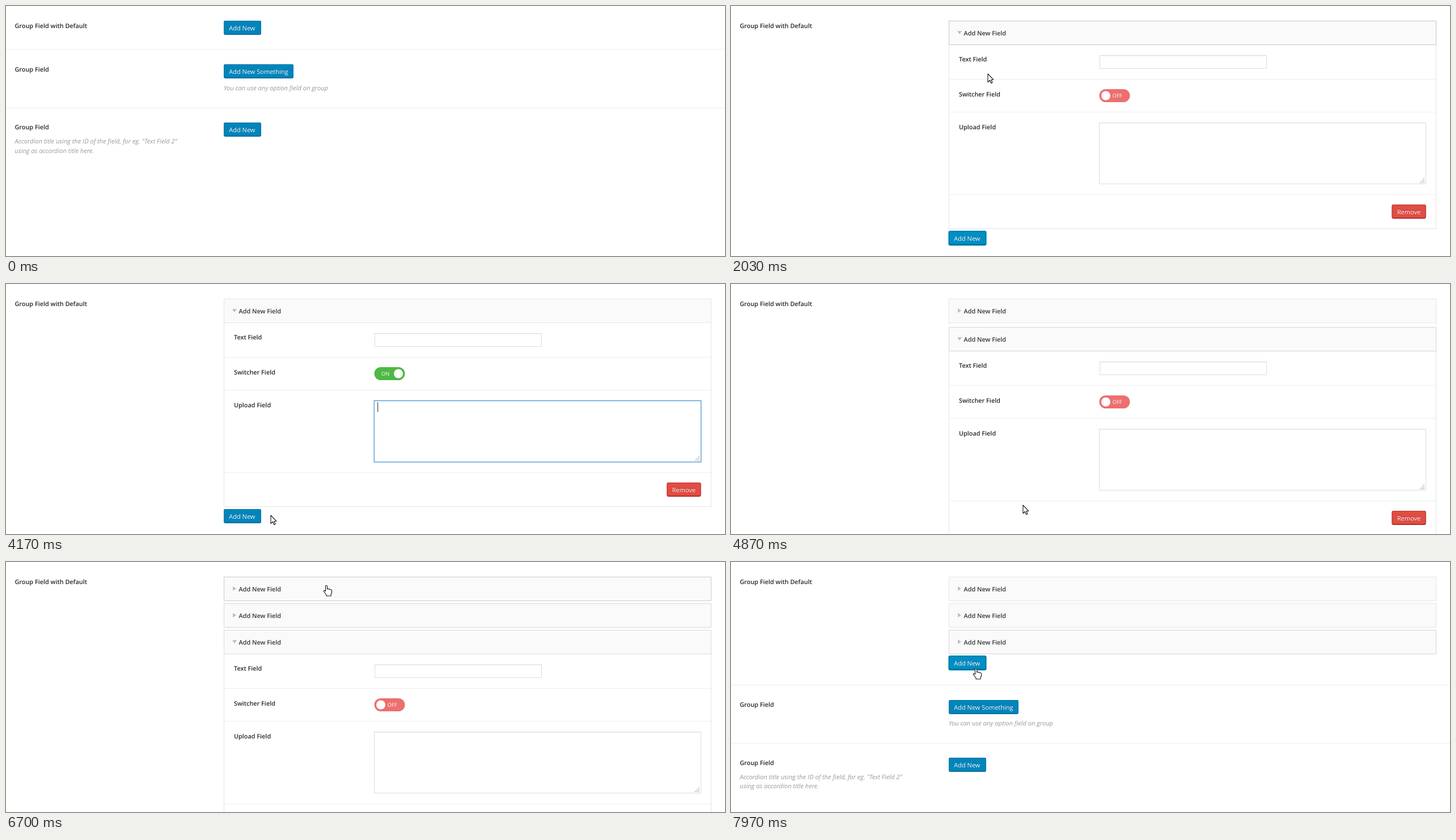
These frames come from a looping animation (1268x442 px, 8000 ms). An HTML page with a canvas:

```html
<!DOCTYPE html>
<html lang="en">
<head>
<meta charset="utf-8">
<title>Group field accordion</title>
<style>
html, body { margin: 0; width: 100%; height: 100%; overflow: hidden; background: #fff; }
canvas { display: block; }
</style>
</head>
<body>
<canvas id="stage" width="1268" height="442"></canvas>
<script>
const ctx = document.getElementById('stage').getContext('2d');
ctx.textRendering = 'geometricPrecision';
const LOOP = 8000, SLIDE = 200, FADE = 200, PACE = 2.35;
const TOP = 26, HEAD = 43, BODY = 325, PITCH = 46.8;
const LEFT = 384, WIDE = 860;
const FAMILY = '"Open Sans", "Noto Sans", sans-serif';
const BOLD = `600 10.85px ${FAMILY}`, PLAIN = `11px ${FAMILY}`;
const SMALL = `9.3px ${FAMILY}`, HINT = `italic 11.1px ${FAMILY}`;
const DARK = '#23282d', GREY = '#999', LINE = '#eee';
const BLUE = ['#0085ba', '#0073aa', '#006799'], LIT = ['#008ec2', '#006799', '#006799'];
const RED = ['#e14d43', '#c0342a', '#a02222'];

// Controls of an open panel, placed as in the topmost item.
const field = [650, 87, 295, 24], knob = [649.5, 147, 54, 23], area = [649, 206, 577, 109];

// Item i opens at clicks[i] and closes at clicks[i + 1].
const clicks = [1278, 4683, 6330, 7300];
const typeAt = 3120, switchAt = 3640, writeAt = 4000;

// Pointer stops: arrival time, x, y.
const stops = [
  [500, 500, 416], [1130, 424, 40], [2030, 453, 120], [2500, 560, 346], [3060, 720, 98],
  [3640, 690, 158], [3770, 700, 248], [4000, 700, 248], [4170, 467, 409], [4330, 396, 420],
  [4870, 515, 391], [5330, 519, 145], [5620, 363, 300], [5900, 410, 446], [6300, 425, 446],
  [6700, 565, 41], [7000, 520, 140], [7940, 432, 188]
];

const clamp = v => Math.min(1, Math.max(0, v));
const swing = p => 0.5 - Math.cos(Math.PI * clamp(p)) / 2;
const mix = (a, b, p) => a + (b - a) * p;
const within = (t, a, b) => t >= a && t < b;
const inside = (px, py, [x, y, w, h]) => within(px, x, x + w) && within(py, y, y + h);

// Items present at time t, with their top and panel height, and the height of the whole list.
function layout(t) {
  const slid = i => swing((t - clicks[i]) / SLIDE);
  const items = [];
  let y = TOP;
  for (let i = 0; i < 3 && t >= clicks[i]; i++) {
    const h = BODY * (slid(i) - slid(i + 1));
    items.push({ y: Math.round(y), h, open: t < clicks[i + 1] });
    y += PITCH + h;
  }
  return { items, total: y - TOP };
}

// The pointer rests at a stop, then leaves just in time for the next one.
function pointerAt(t) {
  const k = stops.findLastIndex(s => s[0] <= t);
  if (k < 0) return null;
  const [t0, x0, y0] = stops[k], [t1, x1, y1] = stops[k + 1] || stops[k];
  const travel = Math.max(1, Math.min(t1 - t0, PACE * Math.hypot(x1 - x0, y1 - y0)));
  const p = swing((t - t1 + travel) / travel) * (t1 > t0);
  return [mix(x0, x1, p), mix(y0, y1, p)];
}

// What lies under the pointer at time t.
function hit(t) {
  const at = pointerAt(t);
  if (!at) return {};
  const [x, y] = at, { items, total } = layout(t);
  const head = items.findIndex(it => inside(x, y, [LEFT, it.y, WIDE, HEAD]));
  const button = inside(x, y, [LEFT, TOP + total, 66, 25]);
  const panel = items.find(it => it.h > BODY / 2);
  const over = box => panel && inside(x, y - panel.y + TOP, box);
  const shape = head >= 0 || button || over(knob) ? 'hand' : over(field) || over(area) ? 'beam' : 'arrow';
  return { x, y, head, button, shape };
}

// Share of the last moments that the pointer spent on a header.
function hoverLevel(t, i) {
  const steps = 20;
  let n = 0;
  for (let k = 0; k < steps; k++) n += hit(t - k * FADE / steps).head === i;
  return n / steps;
}

function text(str, x, y, font, color) {
  ctx.font = font;
  ctx.fillStyle = color;
  ctx.fillText(str, x, y);
}

function rect(x, y, w, h, color) {
  ctx.fillStyle = color;
  ctx.fillRect(x, y, w, h);
}

function round(x, y, w, h, r, color) {
  ctx.fillStyle = color;
  ctx.beginPath();
  ctx.roundRect(x, y, w, h, r);
  ctx.fill();
}

function frame(x, y, w, h, color) {
  ctx.strokeStyle = color;
  ctx.lineWidth = 1;
  ctx.strokeRect(x + 0.5, y + 0.5, w - 1, h - 1);
}

function shadowed(color, blur, dy, paint) {
  ctx.save();
  Object.assign(ctx, { shadowColor: color, shadowBlur: blur, shadowOffsetY: dy });
  paint();
  ctx.restore();
}

function button(label, x, y, w, [fill, edge, base], halo) {
  if (halo) shadowed('#33b3db', 2, 0, () => round(x - 0.5, y - 0.5, w + 1, 26, 3, '#33b3db'));
  round(x, y, w, 25, 3, base);
  round(x, y, w, 24, 3, edge);
  round(x + 1, y + 1, w - 2, 22, 2, fill);
  shadowed(base, 1, -1, () => text(label, x + 9.3, y + 17, PLAIN, '#fff'));
}

function input([x, y, w, h], focused) {
  if (focused) frame(x - 1, y - 1, w + 2, h + 2, '#b9d8ef');
  rect(x, y, w, h, '#fff');
  rect(x + 1, y + 1, w - 2, 1, '#f4f4f4');
  frame(x, y, w, h, focused ? '#5b9dd9' : '#ddd');
  if (focused) rect(x + 6, y + 3, 1.2, 17, '#444');
}

function toggle(on) {
  const [x, y, w, h] = knob;
  round(x, y, w, h, h / 2, `rgb(${mix(237, 79, on)},${mix(111, 184, on)},${mix(111, 70, on)})`);
  if (on > 0.5) text('ON', x + 12.5, y + 15, SMALL, '#fff');
  else text('OFF', x + 23.3, y + 15, SMALL, '#fff');
  round(x + mix(3.5, 34.5, on), y + 3.5, 16, 16, 8, '#fff');
}

function panel(t, first) {
  frame(LEFT, 68, WIDE, BODY + 1, '#e5e5e5');
  for (const y of [129, 187, 333]) rect(LEFT + 1, y, WIDE - 2, 1, LINE);
  text('Text Field', 402, 98, BOLD, DARK);
  text('Switcher Field', 402, 159.5, BOLD, DARK);
  text('Upload Field', 402, 217.5, BOLD, DARK);
  input(field, first && within(t, typeAt, switchAt));
  toggle(first ? clamp((t - switchAt) / 100) : 0);
  input(area, first && within(t, writeAt, clicks[1]));
  // resize grip
  for (let i = 0; i < 3; i++)
    for (let j = 2 - i; j < 3; j++) rect(1215 + 3 * i, 305 + 3 * j, 1.5, 1.5, GREY);
  button('Remove', 1165.5, 351, 60, RED);
}

function header(y, open, hover) {
  const c = Math.round(mix(229, 153, hover));
  rect(LEFT, y, WIDE, HEAD, '#fafafa');
  frame(LEFT, y, WIDE, HEAD, `rgb(${c},${c},${c})`);
  ctx.save();
  ctx.translate(403, y + 21);
  if (open) ctx.rotate(Math.PI / 2);
  ctx.fillStyle = '#bbb';
  ctx.fill(outlines.marker);
  ctx.restore();
  text('Add New Field', 410.5, y + 26, BOLD, '#32373c');
}

function accordion(t, items) {
  items.forEach(({ y, h, open }, i) => {
    ctx.save();
    ctx.beginPath();
    ctx.rect(LEFT, y + HEAD, WIDE, Math.round(h));
    ctx.clip();
    ctx.translate(0, y - TOP);
    panel(t, i === 0);
    ctx.restore();
    header(y, open, hoverLevel(t, i));
  });
}

function sections(t, shift, hovered) {
  const at = y => Math.round(y + shift);
  const halo = within(t, clicks[0], typeAt) || t >= clicks[1];
  text('Group Field with Default', 15.5, 39, BOLD, DARK);
  button('Add New', LEFT, at(TOP), 66, halo || hovered ? LIT : BLUE, halo);
  rect(0, at(76.4), 1268, 1, LINE);
  text('Group Field', 15.5, at(116), BOLD, DARK);
  button('Add New Something', LEFT, at(103.2), 123, BLUE);
  text('You can use any option field on group', LEFT, at(149), HINT, GREY);
  rect(0, at(179.5), 1268, 1, LINE);
  text('Group Field', 15.5, at(218.4), BOLD, DARK);
  button('Add New', LEFT, at(205.8), 66, BLUE);
  text('Accordion title using the ID of the field, for eg. "Text Field 2"', 15.5, at(243.4), HINT, GREY);
  text('using as accordion title here.', 15.5, at(259.8), HINT, GREY);
}

const outlines = {
  marker: new Path2D('M-2.8 -4L2.8 0L-2.8 4Z'),
  arrow: new Path2D('M0 0V14.5L3.4 11.4L5.8 16.6L8 15.6L5.7 10.6L10 10.3Z'),
  hand: new Path2D('M-1.5 1.5Q0 -1 1.5 1.5V7Q3 5.5 4.3 7.3Q5.8 6.2 7 8Q9 7.2 9.5 9.5V13Q9 15 8 16.5V19H0V17Q-3 13 -4.8 10.5Q-4.5 8 -1.5 10.5Z'),
  beam: new Path2D('M-3 -8H3M0 -8V8M-3 8H3')
};

function pointer({ x, y, shape }) {
  if (!shape) return;
  ctx.save();
  ctx.translate(x, y);
  Object.assign(ctx, { lineWidth: 1.1, lineJoin: 'round', strokeStyle: '#111', fillStyle: '#fff' });
  if (shape !== 'beam') ctx.fill(outlines[shape]);
  ctx.stroke(outlines[shape]);
  ctx.restore();
}

const start = performance.now();

function draw(now) {
  const t = Math.max(0, now - start) % LOOP;
  const { items, total } = layout(t), target = hit(t);
  rect(0, 0, 1268, 442, '#fff');
  sections(t, total, target.button);
  accordion(t, items);
  pointer(target);
  requestAnimationFrame(draw);
}

draw(start);
</script>
</body>
</html>
```
